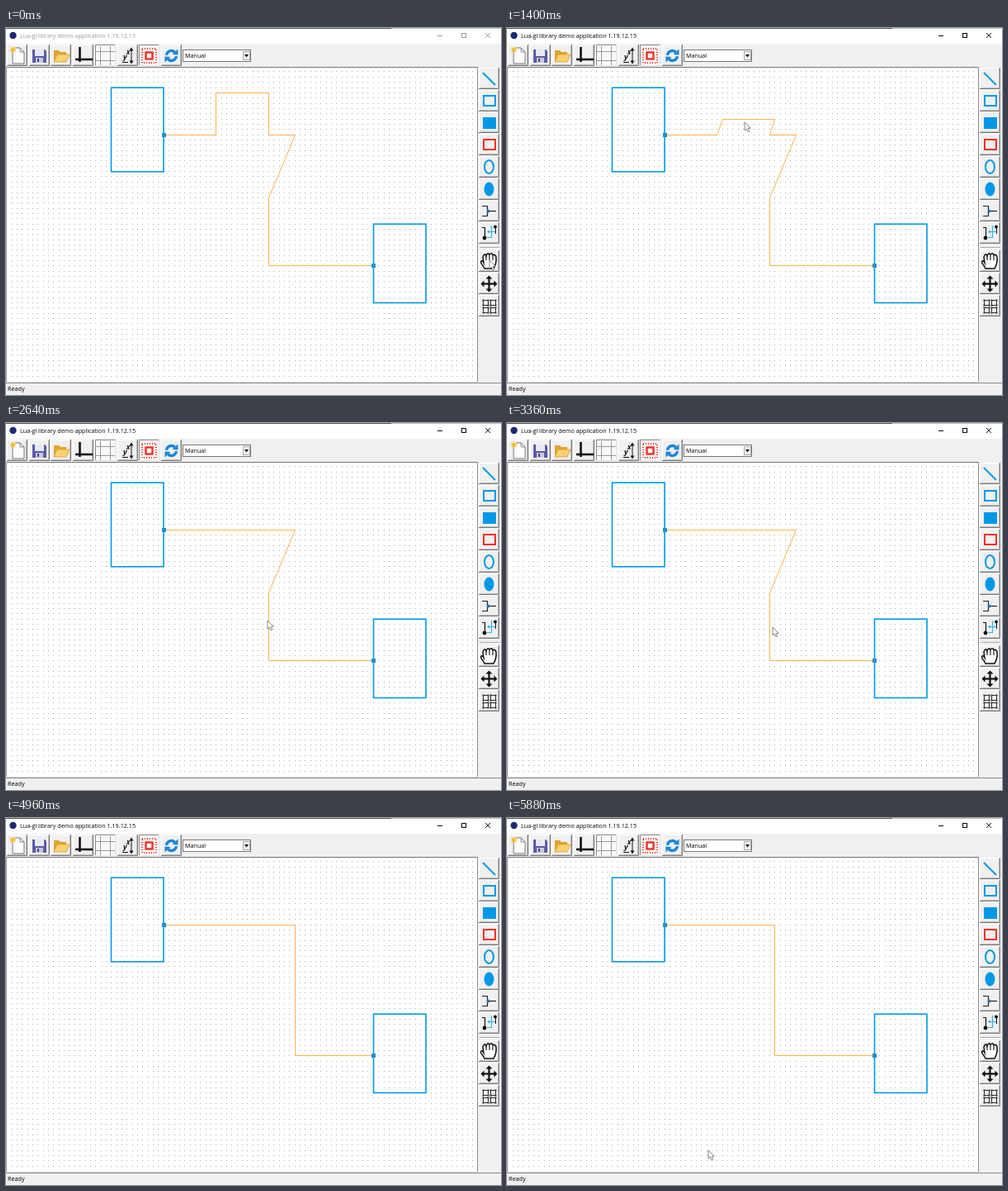
These frames come from a looping animation (600x444 px, 5900 ms). An HTML page with a canvas:

```html
<!DOCTYPE html>
<html lang="en">
<head>
<meta charset="utf-8">
<title>Lua-gl library demo application</title>
<style>
html, body { margin: 0; width: 100%; height: 100%; overflow: hidden; background: #fff; }
canvas { display: block; width: 600px; height: 444px; }
</style>
</head>
<body>
<canvas id="stage" width="600" height="444"></canvas>
<script>
const W = 600, H = 444, LOOP = 5900, STEP = 6.35;
const BLUE = '#0098e6', ORANGE = '#fbb04e', RED = '#ef3124', FACE = '#f0f0f0';
const FONT = '7.2px "Open Sans", "Noto Sans", sans-serif';
const stage = document.getElementById('stage').getContext('2d');
let c = stage;

// Drawing grid: column and row to pixel
const gx = k => 0.8 + STEP * k;
const gy = j => 72 + STEP * j;
const mid = v => Math.floor(v) + 0.5;

function box(x, y, w, h, color) {
  c.fillStyle = color;
  c.fillRect(x, y, w, h);
}
function frame(x, y, w, h, color, width = 1) {
  c.strokeStyle = color;
  c.lineWidth = width;
  c.strokeRect(x, y, w, h);
}
function trace(points, closed) {
  c.beginPath();
  points.forEach(([x, y]) => c.lineTo(x, y));
  if (closed) c.closePath();
}
function line(points, color, width = 1) {
  trace(points);
  c.strokeStyle = color;
  c.lineWidth = width;
  c.stroke();
}
function shape(points, color) {
  trace(points, true);
  c.fillStyle = color;
  c.fill();
}
function oval(x, y, rx, ry, color, width) {
  c.beginPath();
  c.ellipse(x, y, rx, ry, 0, 0, Math.PI * 2);
  c.fillStyle = c.strokeStyle = color;
  c.lineWidth = width || 1;
  if (width) c.stroke(); else c.fill();
}
function label(text, x, y, color = '#000', font = FONT) {
  c.font = font;
  c.fillStyle = color;
  c.fillText(text, x, y);
}
function button(x, y, pressed) {
  const w = 25, h = 26;
  box(x, y, w, h, pressed ? '#f9f9f9' : FACE);
  line([[x + .5, y + h], [x + .5, y + .5], [x + w, y + .5]], pressed ? '#8c8c8c' : '#fff');
  line([[x + w - .5, y], [x + w - .5, y + h - .5], [x, y + h - .5]], pressed ? '#e3e3e3' : '#7a7a7a');
  if (!pressed) line([[x + w - 1.5, y + 1], [x + w - 1.5, y + h - 1.5], [x + 1, y + h - 1.5]], '#bdbdbd');
}

function newIcon() {
  shape([[8, 24], [17, 24], [22, 29], [22, 43], [8, 43]], '#fdfdfd');
  line([[8, 28], [8, 43], [22, 43], [22, 29], [17, 24], [11, 24]], '#777');
  line([[17, 24], [17, 29], [22, 29]], '#888');
  const star = [];
  for (let i = 0; i < 16; i++) {
    const r = i % 2 ? 2 : 5, a = i * Math.PI / 8;
    star.push([8.5 + r * Math.cos(a), 26.5 + r * Math.sin(a)]);
  }
  shape(star, '#f2bd2c');
}
function saveIcon() {
  shape([[32, 26], [47, 26], [49, 28], [49, 42], [32, 42]], '#5a5ba8');
  box(35, 26, 11, 8, '#e9e9f5');
  box(36, 36, 9, 6, '#c9c9dd');
  box(38, 37, 2, 4, '#44458c');
}
function openIcon() {
  shape([[58, 27], [64, 27], [66, 29], [73, 29], [73, 41], [58, 41]], '#dda532');
  shape([[62, 32], [77, 32], [73, 41], [58, 41]], '#fbd171');
  line([[58, 41], [62, 32], [77, 32], [73, 41], [58, 41]], '#d79c2c', .8);
}
function scaleIcon() {
  line([[152, 25], [152, 42]], '#111');
  shape([[149.5, 27.5], [152, 23.5], [154.5, 27.5]], '#111');
  shape([[149.5, 39.5], [152, 43.5], [154.5, 39.5]], '#111');
  line([[141, 41.5], [148, 41.5]], '#111');
  label('x', 146, 32, '#111', 'italic bold 8px "Noto Sans", sans-serif');
  label('y', 142, 38, '#111', 'italic bold 9px "Noto Sans", sans-serif');
}
function snapIcon() {
  frame(169.5, 29.5, 8, 8, RED, 2.4);
  c.setLineDash([1, 2]);
  frame(165, 25, 17, 17, RED, 2);
  c.setLineDash([]);
}
function refreshIcon() {
  for (const turn of [0, Math.PI]) {
    c.save();
    c.translate(200.5, 33.5);
    c.rotate(turn);
    c.beginPath();
    c.arc(0, 0, 6, Math.PI * 1.03, Math.PI * 1.75);
    c.strokeStyle = '#1b86d6';
    c.lineWidth = 3.4;
    c.stroke();
    shape([[8, -8], [8, -1], [1, -1.5]], '#1b86d6');
    c.restore();
  }
}
function handIcon() {
  c.beginPath();
  c.moveTo(580, 291);
  c.bezierCurveTo(578, 286, 574, 284, 576, 282);
  c.bezierCurveTo(577, 281, 578, 282, 579, 284);
  c.lineTo(578, 277);
  for (const [x, y] of [[579, 274], [583, 273], [587, 273], [591, 275]]) {
    c.quadraticCurveTo(x + .5, y - 1.5, x + 2.5, y + .5);
    c.lineTo(x + 3, y + 2);
  }
  c.quadraticCurveTo(595, 284, 591, 291);
  c.closePath();
  c.fillStyle = '#fff';
  c.fill();
  c.strokeStyle = '#111';
  c.lineWidth = 1.5;
  c.stroke();
  for (const x of [582, 586, 590]) line([[x, 276], [x, 281]], '#111', 1.1);
}
function moveIcon() {
  for (let i = 0; i < 4; i++) {
    c.save();
    c.translate(585.5, 309.5);
    c.rotate(i * Math.PI / 2);
    line([[0, 0], [0, -7]], '#111', 2.2);
    shape([[-4, -6], [0, -10], [4, -6]], '#111');
    c.restore();
  }
}
function groupIcon() {
  for (const x of [578, 587]) for (const y of [329, 338]) {
    frame(x + .5, y + .5, 6, 6, '#333');
    for (const dx of [0, 6]) for (const dy of [0, 6]) box(x + dx - .5, y + dy - .5, 2, 2, '#333');
  }
}
function routeIcon() {
  line([[577, 241.5], [580.5, 241.5], [580.5, 254]], '#111', 1.2);
  oval(580, 254, 2.4, 2.4, '#111');
  oval(593, 240.5, 2, 2, '#111');
  line([[583, 253.5], [588.5, 253.5], [588.5, 239]], '#34b4ee', 1.2);
  line([[584, 246.5], [594, 246.5]], '#34b4ee', 1.2);
  shape([[583, 246.5], [586, 244.5], [586, 248.5]], '#34b4ee');
  line([[593.5, 241], [593.5, 249]], '#111');
}

function paintWindow() {
  box(0, 0, W, H, '#fff');
  box(0, 0, 467, 1, '#555');
  box(467, 0, 133, 1, '#bbb');
  oval(8.5, 9, 4.2, 4.2, '#1d2a72');

  box(0, 19, W, 29, FACE);
  box(571, 47, 29, 383, FACE);
  box(0, 429, W, 15, FACE);
  box(0, 47, 572, 1, '#747474');
  box(0, 47, 1, 382, '#9a9a9a');
  box(571, 47, 1, 382, '#8e8e8e');
  box(0, 428, 572, 1, '#d9d9d9');
  box(0, 429, W, 1, '#8a8a8a');
  label('Ready', 2, 439);

  for (let i = 0; i < 8; i++) button(Math.round(1 + 26.7 * i), 20, i === 4 || i === 6);
  newIcon();
  saveIcon();
  openIcon();
  line([[89.5, 23], [89.5, 41]], '#111', 2.6);
  line([[84, 38], [105, 38]], '#111', 2.6);
  for (const x of [114.5, 126.5]) line([[x, 22], [x, 45]], '#999');
  for (const y of [28.5, 39.5]) line([[109, y], [132, y]], '#999');
  scaleIcon();
  snapIcon();
  refreshIcon();

  box(214, 26, 83, 15, '#fff');
  frame(214.5, 26.5, 82, 14, '#777');
  label('Manual', 217, 36);
  box(287, 28, 9, 11, FACE);
  frame(287.5, 28.5, 8, 10, '#aaa');
  shape([[289, 32], [294, 32], [291.5, 35.5]], '#111');

  for (let i = 0; i < 8; i++) button(573, Math.round(48 + 26.7 * i));
  for (let i = 0; i < 3; i++) button(573, Math.round(269 + 26.8 * i));
  box(574, 265, 24, 1, '#a5a5a5');
  box(574, 266, 24, 1, '#fff');
  line([[578, 54], [593, 69]], BLUE, 2);
  frame(579, 82, 14, 12, BLUE, 2);
  box(578, 108, 16, 14, BLUE);
  frame(579, 135, 14, 12, RED, 2);
  oval(585.5, 168, 5.5, 8, BLUE, 2);
  oval(585.5, 195, 6, 8.5, BLUE);
  line([[577, 215.5], [583.5, 215.5], [583.5, 227.5], [577, 227.5]], '#222', 1.2);
  line([[583, 221.5], [594, 221.5]], '#222', 1.2);
  oval(584.5, 221.5, 2, 2, '#2274b4');
  routeIcon();
  handIcon();
  moveIcon();
  groupIcon();

  for (let k = 1; gx(k) < 570; k++)
    for (let j = -3; gy(j) < 427; j++) box(Math.floor(gx(k)), Math.floor(gy(j)), 1, 1, '#a8a8a8');
}

// Pointer stops: time, x, y
const STOPS = [
  [0, 586, 281], [40, 586, 281], [560, 278.5, 80], [720, 278.5, 80],
  [1400, 288, 114], [1520, 288, 129], [1700, 288, 129], [2010, 578, 276],
  [2140, 578, 276], [2280, 586, 281], [2450, 586, 281], [2640, 317, 239],
  [2820, 317, 239], [3220, 322, 247], [3360, 322, 247], [3700, 354, 248],
  [3760, 354, 248], [3920, 508, 268], [3980, 508, 268], [4160, 585, 281],
  [4440, 585, 281], [4570, 585, 182], [4670, 602, 125], [4960, 602, 125],
  [5240, 349, 200], [5390, 349, 200], [5540, 322.5, 200], [5820, 322.5, 200],
  [5880, 244, 402], [5900, 244, 402]
];
function pointer(t) {
  const i = Math.max(1, STOPS.findIndex(s => s[0] > t));
  const [t0, x0, y0] = STOPS[i - 1], [t1, x1, y1] = STOPS[i];
  const p = (t - t0) / (t1 - t0), e = p * p * (3 - 2 * p);
  return [x0 + (x1 - x0) * e, y0 + (y1 - y0) * e];
}

// Grid steps dragged since the press at time t0
function dragged(t, t0, t1) {
  const a = pointer(t0), b = pointer(Math.min(Math.max(t, t0), t1));
  return [0, 1].map(n => Math.round((b[n] - a[n]) / STEP));
}
function wire(t) {
  if (t < 1600) {
    const [dx, dy] = dragged(t, 720, 1520);
    return [[30, 9], [40, 9], [40 + dx, 1 + dy], [50 + dx, 1 + dy], [50, 9],
      [55, 9], [50, 21], [50, 34], [70, 34]];
  }
  if (t < 3760) {
    const x = 50 + dragged(t, 3360, 3700)[0];
    return [[30, 9], [55, 9], [x, 21], [x, 34], [70, 34]];
  }
  const x = 55 + dragged(t, 5390, 5540)[0];
  return [[30, 9], [x, 9], [x, 34], [70, 34]];
}

const inactive = t => t < 40 || (t >= 1980 && t < 2320) || (t >= 4200 && t < 4440);

function paintTitle(t) {
  const ink = inactive(t) ? '#9a9a9a' : '#000';
  label('Lua-gl library demo application 1.19.12.15', 17, 12, ink);
  line([[523, 9.5], [529, 9.5]], ink);
  frame(552.5, 6.5, 5, 5, ink);
  line([[581, 6], [587, 12]], ink, .9);
  line([[587, 6], [581, 12]], ink, .9);
}
function paintPointer([x, y]) {
  c.save();
  c.translate(x, y);
  trace([[0, 0], [0, 10], [2.3, 8], [4, 11.8], [5.8, 11], [4.2, 7.4], [7.2, 7.2]], true);
  c.fillStyle = '#fff';
  c.fill();
  c.strokeStyle = '#777';
  c.lineWidth = .9;
  c.stroke();
  c.restore();
}

const back = document.createElement('canvas');
back.width = W;
back.height = H;
c = back.getContext('2d');
paintWindow();
c = stage;

function paint(now) {
  const t = Math.floor(now % LOOP / 20) * 20;
  c.drawImage(back, 0, 0);
  paintTitle(t);
  line(wire(t).map(([k, j]) => [mid(gx(k)), mid(gy(j))]), ORANGE);
  for (const [k, j, w, h] of [[20, 0, 10, 16], [70, 26, 10, 15]])
    frame(mid(gx(k)), mid(gy(j)) - .3, STEP * w, STEP * h, BLUE, 1.6);
  for (const [k, j] of [[30, 9], [70, 34]])
    box(mid(gx(k)) - 2.5, mid(gy(j)) - 2.5, 5, 5, '#2190d0');
  paintPointer(pointer(t));
}

const start = performance.now();
function tick() {
  paint(performance.now() - start);
  requestAnimationFrame(tick);
}
tick();
</script>
</body>
</html>
```
